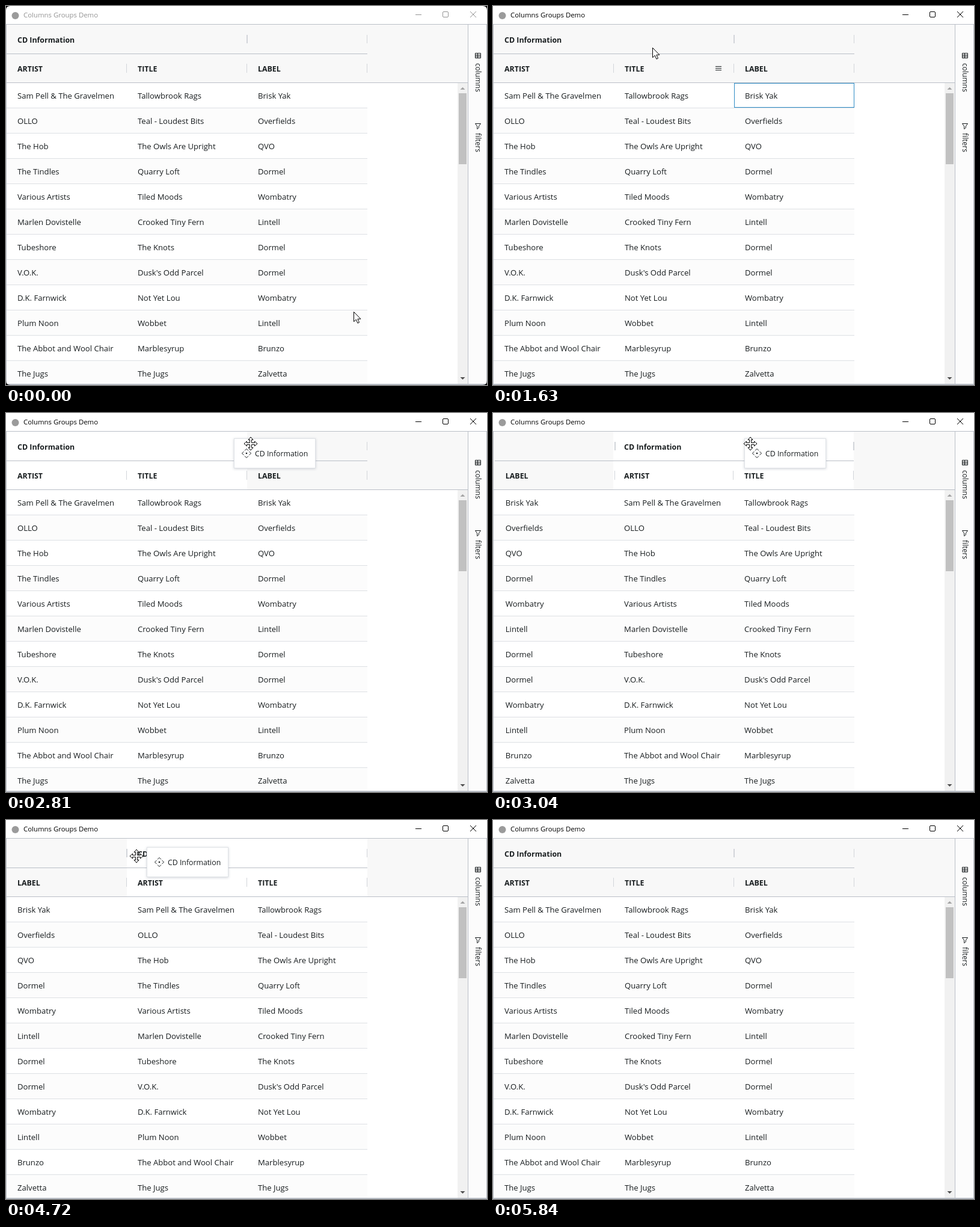
Write an HTML page that moves like this. It is 800 by 630 pixels and loops after 6.41 s.

```html
<!DOCTYPE html>
<html lang="en">
<head>
<meta charset="utf-8">
<title>Column groups</title>
<style>
  html, body { margin: 0; width: 100%; height: 100%; overflow: hidden; background: #fff; }
  svg { display: block; width: 800px; height: 630px; }
  text { font: 13.1px "Open Sans", "Noto Sans", sans-serif; fill: #181d1f; white-space: pre; }
  rect { shape-rendering: crispEdges; }
  .head { font-size: 12.4px; font-weight: 700; }
  .side { font-size: 12.1px; }
  .small { font-size: 12.3px; }
  .line { fill: none; stroke: #181d1f; }
  #title { font-size: 11.4px; fill: currentColor; }
  #chrome { color: #000; }
  #chrome.idle { color: #949494; }
  #card { filter: drop-shadow(0 1px 2px rgba(150, 158, 170, .45)); }
</style>
</head>
<body>
<svg viewBox="0 0 800 630" xmlns="http://www.w3.org/2000/svg">
  <defs>
    <clipPath id="grid"><rect x="1" y="31" width="600" height="597"/></clipPath>
    <path id="chevron" class="line" d="M-3-4.5L0-7.5L3-4.5"/>
    <path id="arm" fill="#fff" stroke="#000" d="M-1.5-1.5v-5H-4L0-11L4-6.5H1.5v5"/>
  </defs>

  <rect width="800" height="630" fill="#fff"/>
  <rect x="1" y="31" width="767" height="96" fill="#f8f8f8"/>
  <rect x="769" y="31" width="30" height="597" fill="#fcfcfc"/>
  <g id="rows"></g>

  <g clip-path="url(#grid)">
    <g id="group">
      <rect id="lift" x="1" y="31" width="400" height="96" fill="#fff"/>
    </g>
    <g id="label"></g>
  </g>

  <rect id="focus" x="401.5" y="128.5" width="199" height="40" fill="none" stroke="#2f8cc6"/>
  <path id="menu" class="line" d="M370 100.5h10m-10 3h10m-10 3h10"/>

  <!-- window frame -->
  <g fill="#babfc7">
    <rect y="30" width="800" height="1"/>
    <rect x="1" y="127" width="767" height="1"/>
    <rect x="768" y="31" width="1" height="598"/>
    <rect y="628" width="800" height="2"/>
    <rect y="30" width="1" height="600"/>
    <rect x="799" y="30" width="1" height="600"/>
  </g>

  <!-- scroll bar -->
  <rect x="751" y="128" width="17" height="500" fill="#f1f1f1"/>
  <rect x="753" y="145" width="13" height="118" fill="#c1c1c1"/>
  <path d="M755.5 139h8l-4-4z" fill="#a3a3a3"/>
  <path d="M755.5 617h8l-4 4z" fill="#505050"/>

  <!-- side bar -->
  <path class="line" d="M780.5 78.5h9v8h-9zm0 3h9m-5 -3v8m-4-2.5h9"/>
  <text class="side" transform="translate(780.5 95) rotate(90)">columns</text>
  <path class="line" d="M780.5 195.5h9l-3.2 4.5v2.5l-2.6 2v-4.5z"/>
  <text class="side" transform="translate(780.5 211) rotate(90)">filters</text>

  <!-- title bar -->
  <circle cx="15.5" cy="16" r="6" fill="#9b9b9b"/>
  <g id="chrome">
    <text id="title" x="29" y="19">Columns Groups Demo</text>
    <g fill="none" stroke="currentColor">
      <path d="M681 14.5h10M772 9l10 10m0-10l-10 10"/>
      <rect x="726.5" y="9.5" width="9" height="9" rx="1.5" style="shape-rendering:auto"/>
    </g>
  </g>
  <path id="corners" d="M0 0h7q-7 0-7 7zM800 0h-7q7 0 7 7zM0 630h7q-7 0-7-7zM800 630h-7q7 0 7-7z"/>

  <g id="card">
    <rect x=".5" y=".5" width="135" height="49" fill="#fff" stroke="#dfe2e6"/>
    <g id="mark" transform="translate(21 25)"><circle r="1.3" fill="#181d1f"/></g>
    <text class="small" x="35" y="30">CD Information</text>
  </g>
  <path id="arrow" d="M.5.5v16.2l3.8-3.5 2.6 6 2.6-1.2-2.6-5.8h5z" fill="#fff" stroke="#000"/>
  <g id="cross"></g>
</svg>
<script>
const LOOP = 6410;
const el = id => document.getElementById(id);

const discs = [
  ["Sam Pell & The Gravelmen", "Tallowbrook Rags", "Brisk Yak"],
  ["OLLO", "Teal - Loudest Bits", "Overfields"],
  ["The Hob", "The Owls Are Upright", "QVO"],
  ["The Tindles", "Quarry Loft", "Dormel"],
  ["Various Artists", "Tiled Moods", "Wombatry"],
  ["Marlen Dovistelle", "Crooked Tiny Fern", "Lintell"],
  ["Tubeshore", "The Knots", "Dormel"],
  ["V.O.K.", "Dusk's Odd Parcel", "Dormel"],
  ["D.K. Farnwick", "Not Yet Lou", "Wombatry"],
  ["Plum Noon", "Wobbet", "Lintell"],
  ["The Abbot and Wool Chair", "Marblesyrup", "Brunzo"],
  ["The Jugs", "The Jugs", "Zalvetta"]
];

function add(parent, tag, attrs, text) {
  const node = document.createElementNS("http://www.w3.org/2000/svg", tag);
  for (const k in attrs) node.setAttribute(k, attrs[k]);
  if (text) node.textContent = text;
  el(parent).append(node);
}
const box = (parent, x, y, width, height, fill) =>
  add(parent, "rect", { x, y, width, height, fill });

function column(parent, index, name) {
  const x = 19 + 200 * index;
  add(parent, "text", { x, y: 109, class: "head" }, name);
  box(parent, x + 181, 96, 1, 15, "#d2d5da");
  discs.forEach((d, i) => add(parent, "text", { x, y: 154 + 42 * i }, d[index]));
}

// Header of a group that spans from x to x + width
function groupHead(parent, x, width) {
  box(parent, x, 79, width, 1, "#babfc7");
  box(parent, x + width - 1, 48, 2, 14, "#d2d5da");
}

discs.forEach((d, i) => {
  const y = 128 + 42 * i;
  if (i % 2) box("rows", 1, y, 600, 41, "#fcfcfc");
  if (i < 11) box("rows", 1, y + 41, 600, 1, "#dde0e4");
});
column("group", 0, "ARTIST");
column("group", 1, "TITLE");
column("label", 2, "LABEL");
add("group", "text", { x: 19, y: 61, class: "head" }, "CD Information");
groupHead("group", 1, 400);
groupHead("label", 401, 200);

for (let a = 0; a < 360; a += 90) {
  add("mark", "use", { href: "#chevron", transform: `rotate(${a})` });
  add("cross", "use", { href: "#arm", transform: `rotate(${a})` });
}
box("cross", -1, -1, 2, 2, "#fff");

// The screen refreshes at a fixed pace, counted anew from each burst of activity
const STEP = 78.8;
const bursts = [0, 1150, 1800, 2330, 4170, 5110, 5700];
function refresh(time) {
  const from = bursts.findLast(b => b <= time);
  return from + Math.floor((time - from) / STEP) * STEP;
}

function ease(t, start, end = start + 200) {
  const k = Math.min(1, Math.max(0, (t - start) / (end - start)));
  return k * k * (3 - 2 * k);
}

// Pointer strokes: start, end, and the point reached
const strokes = [
  [1080, 1622, 265, 69],
  [1650, 2180, 209, 48],
  [2330, 2914, 428, 51],
  [3270, 3350, 431, 57],
  [4170, 4910, 127, 61],
  [5620, 5800, 165, 120]
];
function pointer(t) {
  return strokes.reduce(([x, y], [a, b, u, v]) => {
    const k = ease(t, a, b);
    return [x + (u - x) * k, y + (v - y) * k];
  }, [578, 508]).map(Math.round);
}

const within = (t, a, b) => t >= a && t < b;
const show = (id, on) => el(id).style.opacity = +on;
const move = (id, x, y = 0) => el(id).setAttribute("transform", `translate(${x} ${y})`);

function draw(time) {
  const t = refresh(time);
  const swap = ease(t, 2847) - ease(t, 4740);
  move("group", 200 * swap);
  move("label", -400 * swap);

  // The dragged card trails the pointer a little
  const drag = within(t, 2400, 3330) || within(t, 4240, 5110);
  const [cx, cy] = pointer(t - 45);
  move("card", cx - 10, Math.max(42, cy - 14));
  move("arrow", ...pointer(t));
  move("cross", ...pointer(t));
  show("lift", drag);
  show("card", drag);
  show("cross", drag);
  show("arrow", !drag && t < 5760);

  show("focus", within(t, 70, 2330));
  show("menu", t < 1540 ? 0 : 1 - ease(t, 1650));
  show("corners", t < 470);
  el("chrome").classList.toggle("idle", t < 70);
}

const start = performance.now();
function frame() {
  draw((performance.now() - start) % LOOP);
  requestAnimationFrame(frame);
}
frame();
</script>
</body>
</html>
```
